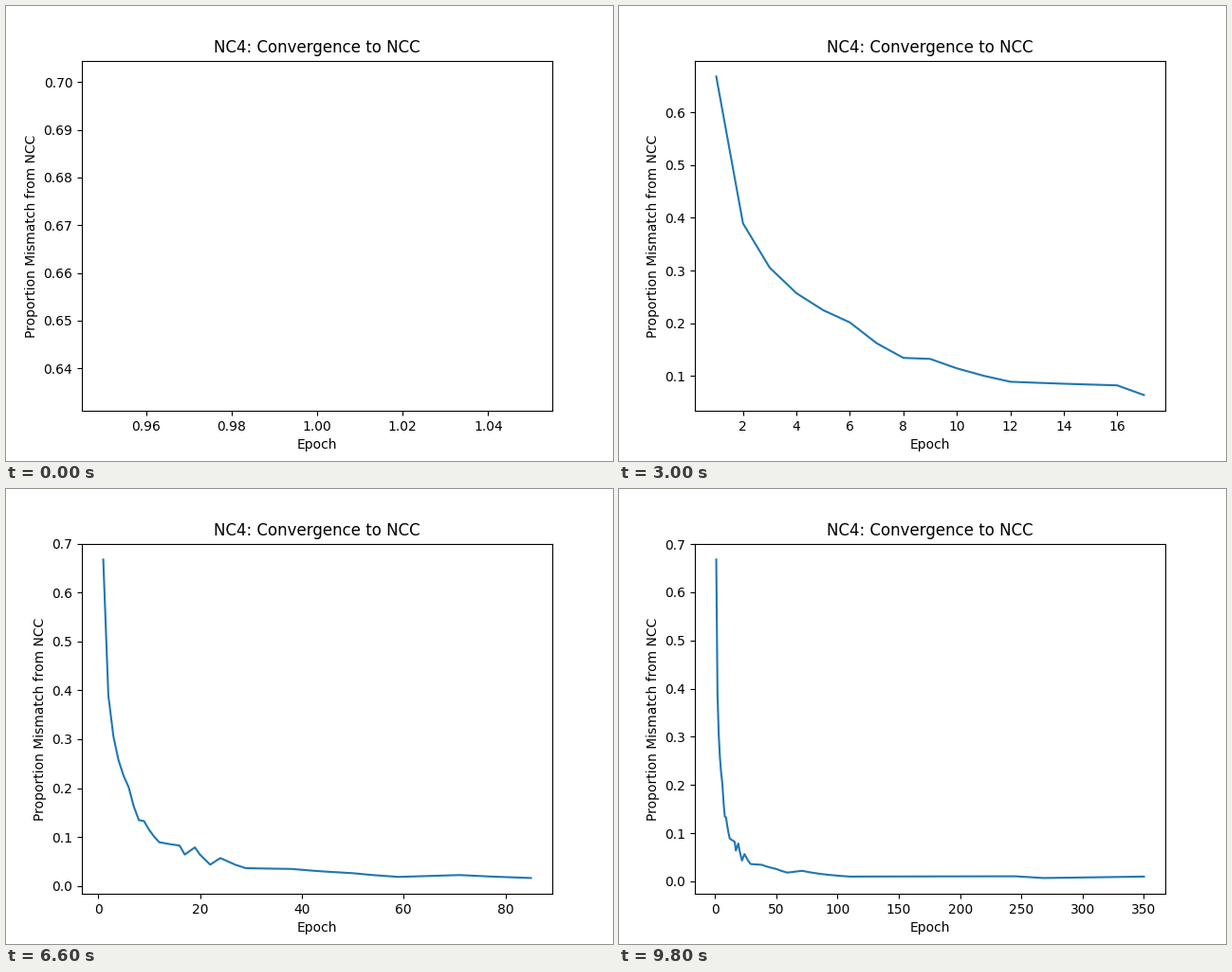
Write a matplotlib script that moves like this. It is 640 px wide and 480 px high and loops after 10000 ms.

```python
import numpy as np
import matplotlib.pyplot as plt
from matplotlib.animation import FuncAnimation

INTERVAL = 200
LAST_EPOCH = 350

# Bends of the curve as (epoch, mismatch); between them it follows power laws.
BENDS = [
    (1, 0.66778), (2, 0.3894), (6, 0.2016), (8, 0.1344), (9, 0.1325),
    (12, 0.0892), (16, 0.0823), (17, 0.064), (19, 0.0786), (22, 0.0433),
    (24, 0.0567), (29, 0.0361), (38, 0.0345), (50, 0.0258), (59, 0.0182),
    (71, 0.022), (110, 0.01), (245, 0.0106), (268, 0.007), (350, 0.01),
]


def log_epochs(last, steps):
    """Distinct whole epochs, spaced evenly on a log scale."""
    return np.unique(np.floor(np.geomspace(1, last, steps) + 0.55))


def mismatch(epoch):
    x, y = np.log(BENDS).T
    return np.exp(np.interp(np.log(epoch), x, y))


epochs = log_epochs(LAST_EPOCH, 67)
values = mismatch(epochs)

fig, ax = plt.subplots(figsize=(6.4, 4.8), dpi=100)


def draw(i):
    """Plot the history up to step i, with the axes fitted to it."""
    ax.clear()
    ax.plot(epochs[:i + 1], values[:i + 1], color="tab:blue", lw=1.5)
    ax.set_title("NC4: Convergence to NCC")
    ax.set_xlabel("Epoch")
    ax.set_ylabel("Proportion Mismatch from NCC")
    return ax.lines


anim = FuncAnimation(fig, draw, frames=len(epochs), init_func=lambda: draw(0),
                     interval=INTERVAL, repeat=True, repeat_delay=0)
plt.show()
```
